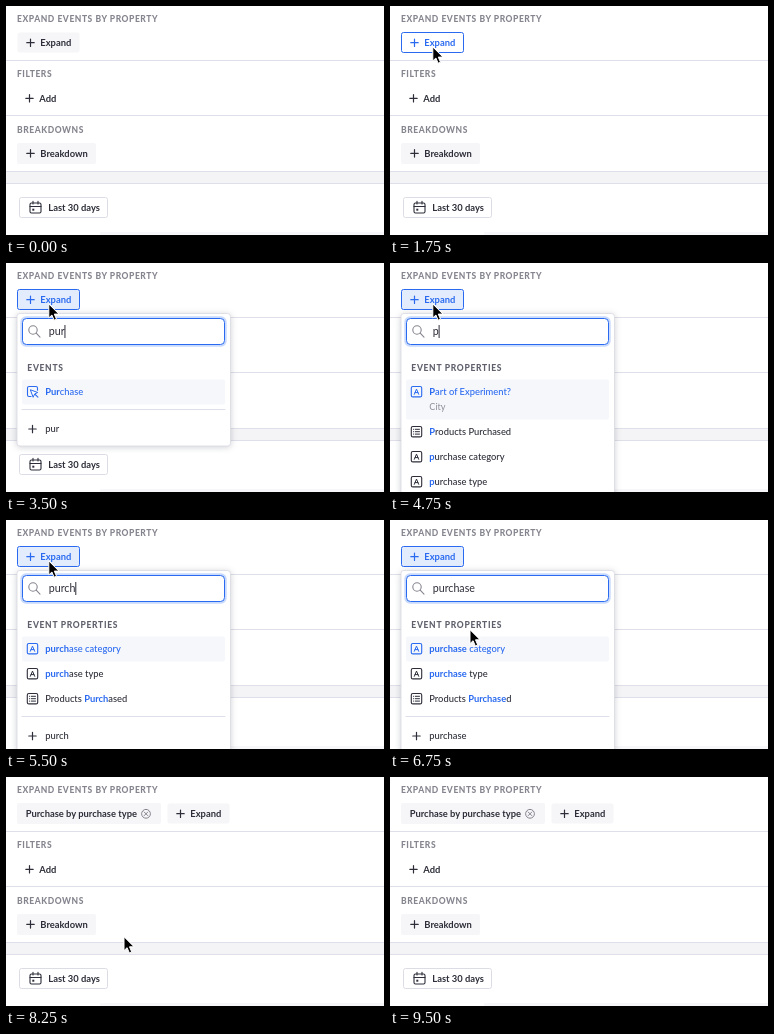
Recreate the animation shown at these times as an HTML page. Size 378x229 px, loop 10000 ms.

```html
<!DOCTYPE html>
<html lang="en">
<head>
<meta charset="utf-8">
<title>Expand events by property</title>
<style>
html, body { margin: 0; width: 100%; height: 100%; overflow: hidden; background: #fff; }
svg { display: block; font: 700 9.4px Lato, "Open Sans", sans-serif; }
.head { font-size: 8.5px; font-weight: 800; letter-spacing: .55px; fill: #85858f; }
.sub { font-size: 8.5px; font-weight: 800; letter-spacing: .7px; fill: #5f606c; }
.item { font-size: 9.35px; font-weight: 500; }
.item .hit { font-weight: 700; fill: #2a6af0; }
.note { font-size: 9.15px; font-weight: 400; fill: #8c8d99; }
.query { font-size: 10.7px; font-weight: 400; }
.title { font-size: 10.7px; }
.num { font: 9.3px "DejaVu Sans Mono", monospace; }
.panel { filter: drop-shadow(0 1px 3px rgba(40, 45, 70, .22)); }
</style>
</head>
<body>
<svg id="stage" width="378" height="229" viewBox="0 0 378 229"></svg>
<script>
const LOOP = 10000;
const INK = '#2d2e39', BLUE = '#2a6af0', RULE = '#dfdfe9', PALE = '#f6f6f8', GREY = '#85858f';
const stage = document.getElementById('stage');

const lists = {
  events: {
    head: 'EVENTS',
    rows: () => ['Add to Cart', 'Checkout', 'Page View', 'Purchase', 'Sign Up'].map(name => ({ name, icon: 'event' }))
  },
  props: {
    head: 'EVENT PROPERTIES',
    rows: q => {
      const part = { name: 'Part of Experiment?', icon: 'letter', note: 'City' };
      const products = { name: 'Products Purchased', icon: 'list' };
      const own = ['purchase category', 'purchase type'].map(name => ({ name, icon: 'letter' }));
      return q.length < 2 ? [part, products, ...own] : [...own, products];
    }
  }
};

// Each step changes only the named parts of the state.
const steps = [
  [0, { cursor: null, button: 'plain', list: null, query: '', row: 0, popup: 0, caret: true, done: false }],
  [500, { cursor: [53.5, 51.5] }],
  [750, { cursor: [44.5, 45.5] }],
  [1000, { cursor: [35.5, 39.5] }],
  [1250, { cursor: [42.8, 41.3] }],
  [1750, { button: 'focus' }],
  [2000, { button: 'open', list: 'events', caret: false }],
  [2500, { caret: true }],
  [3000, { query: 'p' }],
  [3250, { query: 'pu' }],
  [3500, { query: 'pur' }],
  [4000, { list: 'props', query: '', caret: false }],
  [4250, { caret: true }],
  [4750, { query: 'p' }],
  [5000, { query: 'pu' }],
  [5250, { query: 'pur' }],
  [5500, { query: 'purch' }],
  [5750, { query: 'purcha' }],
  [6000, { query: 'purchase' }],
  [6500, { cursor: [52, 60], caret: false }],
  [6750, { cursor: [80, 110] }],
  [7000, { cursor: [106, 147], row: 1 }],
  [7250, { cursor: [116, 158], popup: 1 }],
  [7500, { cursor: [118, 160], popup: 2 }],
  [8000, { list: null, popup: 0, done: true, button: 'open' }],
  [8250, { button: 'plain' }],
  [9500, { cursor: null }]
];
const states = [];
steps.forEach(([, patch], i) => states.push({ ...states[i - 1], ...patch }));

const rect = (x, y, w, h, fill, stroke = 'none', r = 0, sw = 1) =>
  `<rect x="${x}" y="${y}" width="${w}" height="${h}" rx="${r}" fill="${fill}" stroke="${stroke}" stroke-width="${sw}"/>`;
const path = (d, stroke = INK, sw = 1.1, fill = 'none') =>
  `<path d="${d}" fill="${fill}" stroke="${stroke}" stroke-width="${sw}" stroke-linecap="round" stroke-linejoin="round"/>`;
const text = (x, y, s, cls = '', fill = '') =>
  `<text x="${x}" y="${y}" class="${cls}" fill="${fill || INK}">${s}</text>`;
const line = (x1, x2, y) => path(`M${x1} ${y}H${x2}`, RULE, 1);
const plus = (x, y, color = INK) => path(`M${x - 3.7} ${y}h7.4M${x} ${y - 3.7}v7.4`, color, 1.2);

function expandButton(x, mode) {
  const on = mode !== 'plain';
  const color = on ? BLUE : INK;
  const fill = { plain: PALE, focus: '#fff', open: '#e3ecfc' }[mode];
  return rect(x + .5, 26.5, 62, 20, fill, on ? BLUE : 'none', 2) +
    plus(x + 13.5, 36.7, color) + text(x + 23.3, 40, 'Expand', '', color);
}

function page(s) {
  let out = rect(0, 0, 378, 229, '#fff') +
    text(11, 16, 'EXPAND EVENTS BY PROPERTY', 'head') +
    line(0, 378, 54.5) + text(11, 71, 'FILTERS', 'head') +
    plus(23.5, 92.3) + text(33.3, 96, 'Add') +
    line(0, 378, 109.5) + text(11, 127, 'BREAKDOWNS', 'head') +
    rect(11, 137, 79, 21, PALE, 'none', 2) + plus(24.5, 147.4) + text(34.3, 151, 'Breakdown') +
    rect(0, 165, 378, 13, '#f4f4f6') + line(0, 378, 165.5) + line(0, 378, 177.5) +
    rect(13.5, 191.5, 88, 20, '#fff', '#dcdce4', 2) +
    rect(24, 197, 11, 10, 'none', INK, 1.5, 1.1) +
    path('M24 200.5h11M27 195.3v2.6M32 195.3v2.6') + rect(26.3, 202.7, 2, 2, INK) +
    text(42.3, 205.2, 'Last 30 days') +
    rect(94, 226, 284, 3, '#f7f7f9');
  if (s.done) {
    out += rect(11, 26, 144, 21, PALE, 'none', 2) + text(19.7, 40, 'Purchase by purchase type') +
      `<circle cx="140" cy="36.8" r="4.4" fill="none" stroke="${GREY}"/>` +
      path('M138.2 35l3.6 3.6M141.8 35l-3.6 3.6', GREY, 1);
  }
  return out + expandButton(s.done ? 161 : 11, s.button);
}

function icon(kind, x, y, color) {
  const box = rect(x - 5.2, y - 5.2, 10.4, 10.4, 'none', color, 1.5, 1.1);
  if (kind === 'letter') return box + path(`M${x - 2.2} ${y + 2.6}l2.2-5.2l2.2 5.2M${x - 1.4} ${y + .9}h2.8`, color, 1);
  if (kind === 'list') {
    return box + [-2.4, 0, 2.4].map(d => path(`M${x - 3} ${y + d}h.2M${x - 1.2} ${y + d}h4.2`, color, 1)).join('');
  }
  return path(`M${x + 5} ${y - 1.5}v-2.2q0-1.5-1.5-1.5h-7q-1.5 0-1.5 1.5v7q0 1.5 1.5 1.5h2`, color) +
    path(`M${x - 1.8} ${y - 1.8}l7 2.6l-3 1.4l-1.4 3z`, color, 1, '#fff') +
    path(`M${x + 2.6} ${y + 2.6}l2.8 2.8`, color, 1.1);
}

function marked(name, q) {
  const at = q ? name.toLowerCase().indexOf(q) : -1;
  if (at < 0) return name;
  const end = at + q.length;
  return `${name.slice(0, at)}<tspan class="hit">${name.slice(at, end)}</tspan>${name.slice(end)}`;
}

function dropdown(s) {
  const { head, rows } = lists[s.list];
  const shown = rows(s.query).filter(r => r.name.toLowerCase().includes(s.query));
  let y = 129, last = y, body = '';
  shown.forEach((r, i) => {
    const color = i === s.row ? BLUE : INK;
    const tall = r.note ? 15 : 0;
    if (i === s.row) body += rect(16, y - 12.5, 203, 25 + tall, '#f5f7fb', 'none', 2);
    body += icon(r.icon, 26.5, y - .3, color) + text(39.3, y + 3.1, marked(r.name, s.query), 'item', color);
    if (r.note) body += text(39.3, y + 18, r.note, 'note');
    last = y + tall;
    y = last + 25;
  });
  let bottom = last + 17;
  if (s.query) {
    body += line(16, 219, last + 17.5) + plus(26.5, last + 37) + text(39.3, last + 40.2, s.query, 'item');
    bottom = last + 54;
  }
  return `<g class="panel">${rect(11, 50.5, 213.5, bottom - 50.5, '#fff', '#dadae3', 3, .8)}</g>` +
    rect(16, 55, 203, 27, 'none', '#c9dafc', 4, 3.4) +
    rect(16.5, 55.5, 202, 26, '#fff', BLUE, 4) +
    `<circle cx="27" cy="67" r="4.2" fill="none" stroke="${GREY}" stroke-width="1.1"/>` +
    path('M30.2 70.2l3.8 4', GREY) +
    (s.query ? text(42.7, 72, s.query, 'query') : text(42.7, 72, 'Search', 'query', '#a3a4ae')) +
    text(21.3, 108, head, 'sub') + body;
}

function popup(stageNo) {
  let out = `<g class="panel">${rect(225, 50, 160, 113, '#fff', '#dadae3', 3, .8)}</g>` +
    text(236, 71, 'purchase type', 'title') + path('M308 64.7l2.3 2.4l-2.3 2.4', GREY, 1);
  if (stageNo > 1) {
    out += rect(236, 84, 45, 14, PALE, 'none', 2) + text(239, 94.2, '165.7 K', 'num') +
      text(284.3, 94, 'events with property', 'note') +
      rect(236, 103, 13, 14, PALE, 'none', 2) + text(239.4, 113.3, '8', 'num') +
      text(253.3, 113, 'queries (30 days)', 'note');
  }
  return out + line(236, 378, 126.5) + icon('letter', 243, 144.5, GREY) +
    text(256, 148, 'string', 'item', '#6c6d79');
}

const pointer = ([x, y]) =>
  path(`M${x} ${y}v13.6l3.1-2.9l2.2 5.2l2.4-1l-2.2-5.1h4.3z`, '#fff', 1, '#000');

function draw(s) {
  stage.innerHTML = page(s) + (s.popup ? popup(s.popup) : '') + (s.list ? dropdown(s) : '');
  if (s.list && s.caret) {
    const typed = s.query ? stage.querySelector('.query').getComputedTextLength() : 0;
    stage.insertAdjacentHTML('beforeend', rect(42.6 + typed, 62, 1, 13, INK));
  }
  if (s.cursor) stage.insertAdjacentHTML('beforeend', pointer(s.cursor));
}

let current = -1;
const start = performance.now();
function tick(now) {
  const t = Math.max(0, now - start) % LOOP;
  const next = steps.filter(([at]) => at <= t).length - 1;
  if (next !== current) draw(states[current = next]);
  requestAnimationFrame(tick);
}
tick(start);
</script>
</body>
</html>
```
